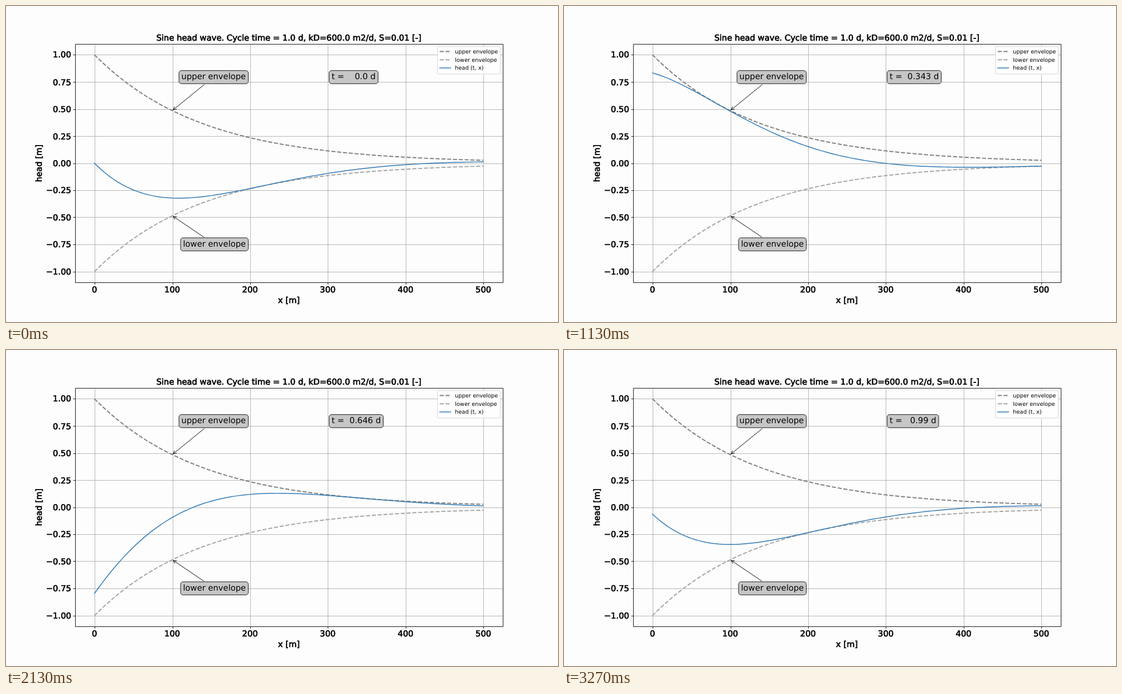
Write an HTML page that moves like this. It is 990x566 px and loops after 3.31 s.

```html
<!DOCTYPE html>
<html lang="en">
<head>
<meta charset="utf-8">
<title>Sine head wave</title>
<style>
  html, body { margin: 0; width: 100%; height: 100%; overflow: hidden; background: #fdfdfd; }
  svg { display: block; font: 15px "DejaVu Sans", sans-serif; text-rendering: geometricPrecision; }
  text { white-space: pre; }
  path, line { fill: none; }
  .grid { stroke: #b5b5b5; }
  .axis { stroke: #16161c; }
  .label { stroke: #000; stroke-width: .7px; }
  .upper { stroke: #7e7e7a; }
  .lower { stroke: #a4a4a2; }
  .upper, .lower { stroke-width: 2px; stroke-dasharray: 7.4 3.2; }
  .head { stroke: #2f78b4; stroke-width: 1.5px; stroke-linecap: square; }
  .box { fill: #c6c6c6; stroke: #18181c; }
  .arrow { stroke: #08080c; }
  .legend { font-size: 10px; }
  .frame { fill: #fefefe; stroke: #d6d6d6; }
</style>
</head>
<body>
<svg id="plot" width="990" height="566" viewBox="0 0 1008 576" preserveAspectRatio="none"></svg>
<script>
const LOOP = 3310, STEPS = 99, LAST = 98;
const LEFT = 126, RIGHT = 907.2, TOP = 69.12, BOTTOM = 504;
const MID_X = (LEFT + RIGHT) / 2, MID_Y = (TOP + BOTTOM) / 2;
const PAD = 4.5;
const plot = document.getElementById('plot');

// Aquifer: kD = 600 m2/d, S = 0.01, one cycle per day
const omega = 2 * Math.PI;
const a = Math.sqrt(omega * 0.01 / (2 * 600));

const px = x => LEFT + (x + 25) / 550 * (RIGHT - LEFT);
const py = y => MID_Y - y / 2.2 * (BOTTOM - TOP);

// Centre thin lines on whole pixels of the scaled stage
const snap = (v, scale) => (Math.floor((Math.round(v) + 0.5) * scale) + 0.5) / scale;
const snapX = x => snap(x, 990 / 1008);
const snapY = y => snap(y, 566 / 576);

function add(tag, attrs, content = '') {
  const el = document.createElementNS(plot.namespaceURI, tag);
  for (const key in attrs) el.setAttribute(key, attrs[key]);
  el.textContent = content;
  return plot.appendChild(el);
}

const line = (x1, y1, x2, y2, cls) => add('line', { x1, y1, x2, y2, class: cls });

const text = (x, y, content, anchor = 'start', cls = '') =>
  add('text', { x, y, 'text-anchor': anchor, class: cls }, content);

function curve(f) {
  let d = 'M';
  for (let x = 0; x <= 500; x += 5) d += `${px(x).toFixed(2)} ${py(f(x)).toFixed(2)} `;
  return d;
}

const textBox = (x, baseline, width) => add('rect', {
  x: x - PAD, y: baseline - 15.9, width: width + 2 * PAD, height: 23.9, rx: PAD, class: 'box'
});

// Open arrow from a label's edge to a point on its envelope
function arrow(x1, y1, x2, y2) {
  const angle = Math.atan2(y2 - y1, x2 - x1), c = Math.cos(angle), s = Math.sin(angle);
  const barb = side => `${x2 - 6 * c - side * 3 * s} ${y2 - 6 * s + side * 3 * c}`;
  add('path', {
    class: 'arrow',
    d: `M${x1} ${y1}L${x2} ${y2}M${barb(1)}L${x2} ${y2}L${barb(-1)}`
  });
}

function note(content, baseline, right) {
  const label = text(right, baseline, content, 'end');
  const width = label.getComputedTextLength();
  textBox(right - width, baseline, width);
  plot.append(label);
}

function drawAxes() {
  const left = snapX(LEFT), bottom = snapY(BOTTOM);
  for (let x = 0; x <= 500; x += 100) {
    const gx = snapX(px(x));
    line(gx, TOP, gx, bottom, 'grid');
    line(gx, bottom, gx, bottom + 3.5, 'axis');
    text(px(x), 522.4, x, 'middle', 'label');
  }
  for (let i = -4; i <= 4; i++) {
    const y = i / 4, gy = snapY(py(y));
    line(left, gy, RIGHT, gy, 'grid');
    line(left - 4, gy, left, gy, 'axis');
    text(119, Math.round(py(y) + 5.5), y.toFixed(2).replace('-', '\u2212'), 'end', 'label');
  }
  text(MID_X, 63, 'Sine head wave. Cycle time = 1.0 d, kD=600.0 m2/d, S=0.01 [-]', 'middle', 'label');
  text(MID_X, 541.4, 'x [m]', 'middle', 'label');
  text(0, 0, 'head [m]', 'middle', 'label')
    .setAttribute('transform', `translate(65 ${MID_Y}) rotate(-90)`);
}

function drawLegend() {
  add('rect', { x: 788, y: 74, width: 114.4, height: 50, rx: 2, class: 'frame' });
  [['upper', 'upper envelope'], ['lower', 'lower envelope'], ['head', 'head (t, x)']]
    .forEach(([cls, name], i) => {
      const y = 82.9 + 15 * i;
      line(792, y, 812, y, cls);
      text(820, y + 3.5, name, 'start', 'legend');
    });
}

drawAxes();
add('path', { class: 'upper', d: curve(x => Math.exp(-a * x)) });
add('path', { class: 'lower', d: curve(x => -Math.exp(-a * x)) });
const head = add('path', { class: 'head' });
add('path', {
  class: 'axis',
  d: `M${snapX(LEFT)} ${snapY(TOP)}H${snapX(RIGHT)}V${snapY(BOTTOM)}H${snapX(LEFT)}Z`
});
arrow(362.2, 143.1, 305.1, 189.4);
arrow(361.3, 421.3, 305.2, 383.5);
note('upper envelope', 133.6, 438);
note('lower envelope', 438.4, 438);
const clockBox = textBox(594.5, 133.6, 90);
const clock = text(594.5, 133.6, '');
drawLegend();

let shown = -1;
function show(step) {
  if (step === shown) return;
  shown = step;
  const t = step / STEPS;
  head.setAttribute('d', curve(x => Math.exp(-a * x) * Math.sin(omega * t - a * x)));
  const days = step ? String(+t.toFixed(3)) : '0.0';
  clock.textContent = `t = ${days.padStart(6)} d`;
  clockBox.setAttribute('width', clock.getComputedTextLength() + 2 * PAD);
}

// 30 steps per second, with delays rounded to 10 ms
const stepAt = ms => Math.min(LAST, Math.floor((Math.floor(ms / 10) * 10 + 5) * 0.03));

const start = performance.now();
function tick() {
  show(stepAt((performance.now() - start) % LOOP));
  requestAnimationFrame(tick);
}
show(0);
tick();
</script>
</body>
</html>
```
